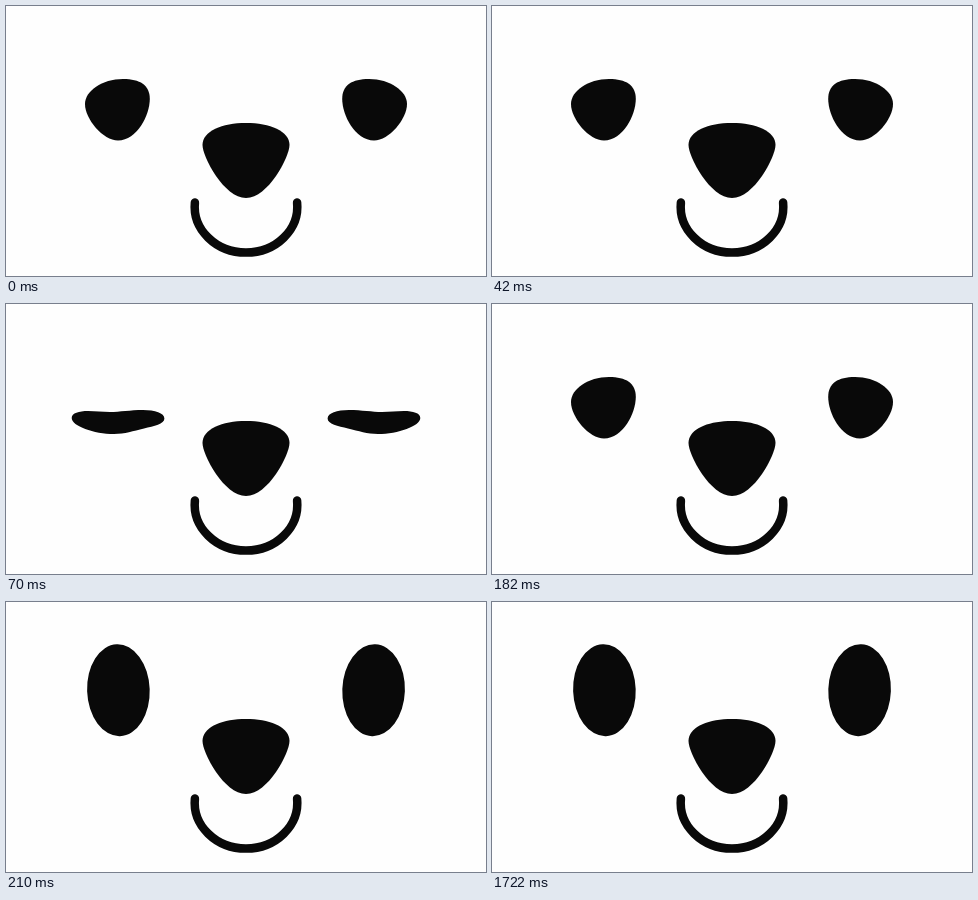
Recreate the animation shown at these times as an HTML page. Size 480x270 px, loop 2730 ms.

```html
<!DOCTYPE html>
<html lang="en">
<head>
<meta charset="utf-8">
<title>Blinking face</title>
<style>
  html, body { margin: 0; width: 100%; height: 100%; overflow: hidden; background: #fefefe; }
  svg { display: block; width: 100%; height: 100%; fill: #090909; }
  .mouth { fill: none; stroke: #090909; stroke-width: 8.5; stroke-linecap: round; }
  .eyes use { visibility: hidden; }
</style>
</head>
<body>
<svg viewBox="0 0 480 270">
  <defs>
    <path id="half" d="M79 98C79 85 96 73 117 73C134 73 143.8 79 143.8 93C143.8 109 131 134.5 112 134.5C97 134.5 79 113 79 98Z"/>
    <path id="shut" d="M65.7 114C65.7 109 73 107 82 107C90 107 96 108 104 108C114 108 124 106 137 106C149 106 158.4 109 158.4 114.5C158.4 120 148 122 138 124.5C127 127 119 130 108 130C88 130 65.7 122 65.7 114Z"/>
    <ellipse id="open" cx="112.4" cy="88.2" rx="31.3" ry="46" transform="rotate(-2 112.4 88.2)"/>
  </defs>
  <g class="eyes" id="left">
    <use href="#half"/><use href="#shut"/><use href="#open"/>
  </g>
  <g class="eyes" id="right" transform="translate(480 0) scale(-1 1)">
    <use href="#half"/><use href="#shut"/><use href="#open"/>
  </g>
  <path d="M240 117C264 117 283.5 125 283.5 139C283.5 151 262 192 240 192C218 192 196.5 151 196.5 139C196.5 125 216 117 240 117Z"/>
  <path class="mouth" d="M188.9 196.5A51.3 46 0 1 0 291.1 196.5"/>
</svg>
<script>
  const LOOP = 2730;
  const steps = [[0, "#half"], [70, "#shut"], [140, "#half"], [210, "#open"]];
  const shapes = document.querySelectorAll(".eyes use");
  const start = performance.now();

  function draw(now) {
    const t = Math.max(0, now - start) % LOOP;
    const pose = steps.filter(([at]) => at <= t).pop()[1];
    for (const shape of shapes) {
      shape.style.visibility = shape.getAttribute("href") === pose ? "visible" : "hidden";
    }
  }

  function tick(now) {
    draw(now);
    requestAnimationFrame(tick);
  }

  draw(start);
  requestAnimationFrame(tick);
</script>
</body>
</html>
```
